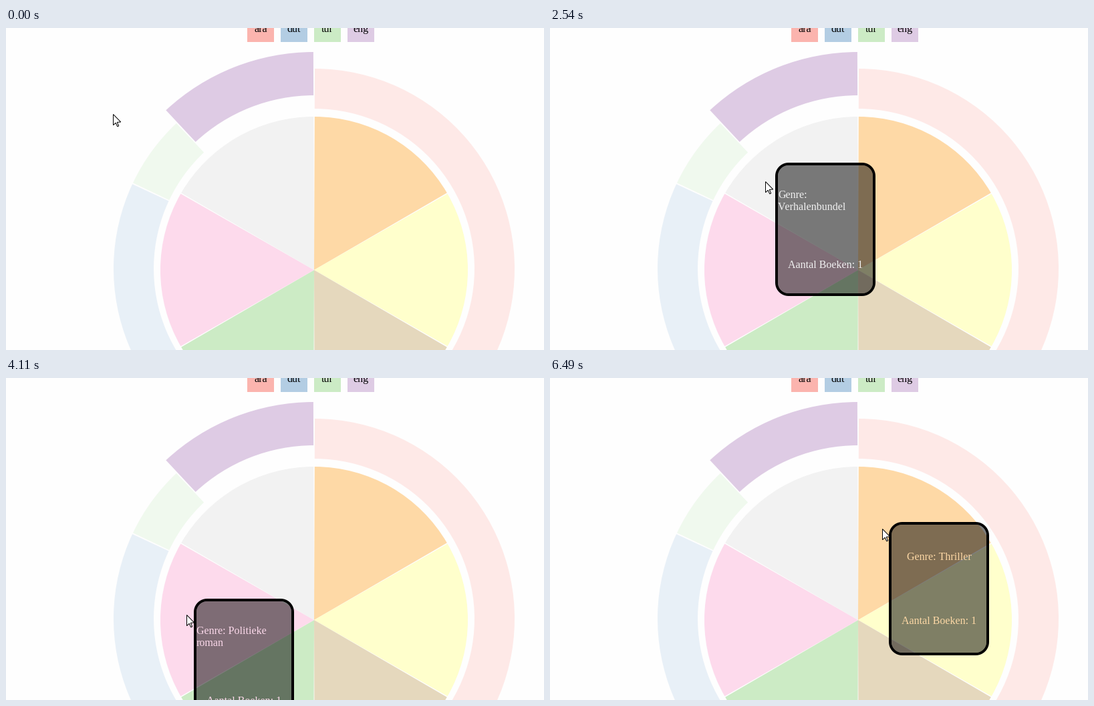
Recreate the animation shown at these times as a matplotlib script. Size 805 px wide and 483 px high, loop 6.52 s.

```python
import numpy as np
import matplotlib.pyplot as plt
from matplotlib.animation import FuncAnimation
from matplotlib.colors import to_rgb
from matplotlib.patches import Polygon, Rectangle, Wedge

W, H, DPI = 805, 483, 72  # at 72 dpi one point is one pixel
LOOP, TICK = 6520, 20

RED, BLUE, GREEN, PURPLE = "#fbb4ae", "#b3cde3", "#ccebc5", "#decbe4"
ORANGE, YELLOW, TAN, PINK, GREY = "#fed9a6", "#ffffcc", "#e5d8bd", "#fddaec", "#f2f2f2"
SLICES = (ORANGE, YELLOW, TAN, GREEN, PINK, GREY)  # clockwise from the top
GENRES = {
    ORANGE: ("Genre: Thriller", ""),
    PINK: ("Genre: Politieke", "roman"),
    GREY: ("Genre:", "Verhalenbundel"),
}
PAPER = "#fefefe"

PIE_CENTER, PIE_RADIUS = np.array([461, 363]), 230
RING_CENTER = (461, 361)
GAP = 0.4  # degrees between neighbouring wedges

# Bursts of evenly spaced screen refreshes: first, last, count
BURSTS = ((1530, 2170, 9), (2230, 2690, 7), (3470, 4110, 9), (4170, 4260, 2),
          (4570, 5210, 9), (5890, 6490, 8))
STEPS = np.concatenate([[0]] + [np.linspace(*burst) for burst in BURSTS])

# Pointer moves: start, end, control point, goal
HOME = (160, 129)
MOVES = (
    (1430, 2490, (241, 179), (322, 230)),
    (3380, 4010, (270, 292), (270, 355)),
    (4500, 4940, (385, 302), (501, 226)),
    (5780, 6230, (499, 226), (497, 226)),
)
LAG = 230  # the tooltip trails the pointer by this many ms
OFFSET = np.array([10, -10])
ENTRY = np.array([394, 170])

plt.rcParams.update({
    "font.family": "Liberation Serif",
    "text.hinting": "native",
    "text.kerning_factor": 6,
})
fig = plt.figure(figsize=((W + 1e-6) / DPI, (H + 1e-6) / DPI), dpi=DPI, facecolor=PAPER)
ax = fig.add_axes([0, 0, 1, 1])
ax.set_xlim(0, W)
ax.set_ylim(H, 0)
ax.axis("off")


def ease(t, start, end):
    u = np.clip((t - start) / (end - start), 0, 1)
    return u * u * (3 - 2 * u)


def mix(a, b, s):
    return (1 - s) * np.asarray(a) + s * np.asarray(b)


def fade(color, opacity):
    return mix((1, 1, 1), to_rgb(color), opacity)


def wedge(center, start, end, color, inner, outer):
    ax.add_patch(Wedge(center, outer, start + GAP / 2, end - GAP / 2,
                       width=outer - inner, facecolor=color, linewidth=0))


def label(x, y, text="", **style):
    return ax.text(x, y, text, fontsize=16, va="baseline", **style)


def draw_chart():
    for k, (name, color) in enumerate(zip(("ara", "dut", "tur", "eng"),
                                          (RED, BLUE, GREEN, PURPLE))):
        x = 361 + 50 * k
        ax.add_patch(Rectangle((x, -19), 40, 40, facecolor=color, linewidth=0))
        label(x + 20, 6, name, ha="center", color="black")

    wedge(RING_CENTER, -90, 110, fade(RED, 0.3), 240, 300)
    wedge(RING_CENTER, 110, 205.2, fade(BLUE, 0.3), 240, 300)
    wedge(RING_CENTER, 205.2, 226.8, fade(GREEN, 0.3), 240, 300)
    wedge(RING_CENTER, 226.8, 270, PURPLE, 260, 325)
    for k, color in enumerate(SLICES):
        wedge(PIE_CENTER, 60 * k - 90, 60 * k - 30, color, 0, PIE_RADIUS)


def rounded(inset, width=150, height=200, radius=20):
    """Outline of the tooltip box, shrunk on all sides by inset."""
    quarter = np.linspace(0, np.pi / 2, 12)
    corners = ((width - radius, height - radius), (radius, height - radius),
               (radius, radius), (width - radius, radius))
    return np.array([
        (cx + (radius - inset) * np.cos(a), cy + (radius - inset) * np.sin(a))
        for k, (cx, cy) in enumerate(corners) for a in quarter + k * np.pi / 2
    ])


def shape(points, **style):
    return ax.add_patch(Polygon(points, **style))


draw_chart()
PANEL, BORDER = rounded(4), rounded(2)
panel = shape(PANEL, facecolor="black", linewidth=0, zorder=5)
border = shape(BORDER, facecolor="none", edgecolor="black", linewidth=4, zorder=5)
first, second, count = texts = [label(0, 0, zorder=6) for _ in range(3)]
count.set_text("Aantal Boeken: 1")
count.set_ha("center")
tooltip_parts = (panel, border, *texts)

ARROW = np.array([(0, 0), (0, 16.2), (3.7, 12.8), (6.2, 18.3), (8.2, 17.4),
                  (5.8, 11.9), (11.2, 11.5)]) + 0.5
arrow = shape(ARROW, facecolor="white", edgecolor="black", linewidth=1, zorder=10)


def pointer(t):
    place = np.array(HOME)
    for start, end, control, goal in MOVES:
        s = ease(t, start, end)
        place = mix(mix(place, control, s), mix(control, goal, s), s)
    return place


def slice_at(point):
    dx, dy = point - PIE_CENTER
    return SLICES[int(np.degrees(np.arctan2(dx, -dy)) % 360 // 60)]


def place_tooltip(corner, lines, opacity, ink):
    x, y = corner
    panel.set_xy(PANEL + corner)
    border.set_xy(BORDER + corner)
    panel.set_alpha(0.5 * opacity)
    border.set_alpha(opacity)

    wrapped = bool(lines[1])
    first.set_ha("left" if wrapped else "center")
    first.set_position((x + (4 if wrapped else 75), y + (53 if wrapped else 57)))
    second.set_position((x + 4, y + 71))
    count.set_position((x + 75, y + (158 if wrapped else 153)))
    first.set_text(lines[0])
    second.set_text(lines[1])
    for text in texts:
        text.set_color(ink)
        text.set_alpha(opacity ** 0.5)


def draw(frame):
    now = frame * TICK + TICK / 2
    t = STEPS[np.searchsorted(STEPS, now, side="right") - 1]
    tip, trail = pointer(t), pointer(t - LAG)
    arrow.set_xy(ARROW + tip.round())

    hovered = np.hypot(*(tip - PIE_CENTER)) < PIE_RADIUS
    for part in tooltip_parts:
        part.set_visible(hovered)
    if hovered:
        color = slice_at(tip)
        ink = mix(to_rgb(slice_at(trail)), to_rgb(color), 0.5)
        corner = mix(ENTRY, trail + OFFSET, ease(t, 2200, 2690)).round()
        place_tooltip(corner, GENRES[color], ease(t, 2200, 2370), ink)
    return (arrow, *tooltip_parts)


anim = FuncAnimation(fig, draw, frames=LOOP // TICK, interval=TICK,
                     repeat=True, repeat_delay=0)
plt.show()
```
